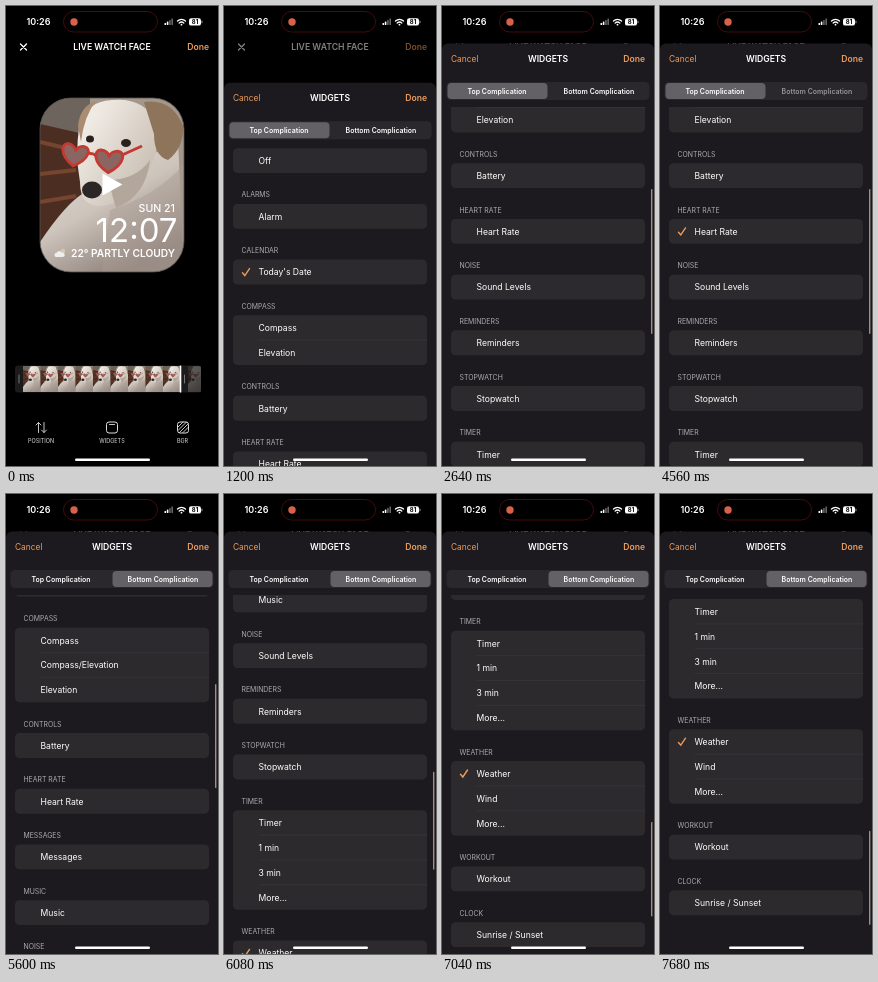
An HTML page for the animation above (8000 ms loop, 212x460 px).

```html
<!DOCTYPE html>
<html lang="en">
<meta charset="utf-8">
<title>Watch face widgets</title>
<style>
html, body { margin: 0; height: 100%; overflow: hidden; background: #000 }
svg { display: block }
#stage { width: 100vw; height: 100vh; font-family: Inter, Roboto, sans-serif }
</style>
<svg id="stage" viewBox="0 0 212 460">
  <defs>
    <clipPath id="list"><rect y="101" width="212" height="359"/></clipPath>
    <clipPath id="face"><rect x="34" y="92" width="144" height="174" rx="31"/></clipPath>
    <linearGradient id="fur" x2=".6" y2="1">
      <stop stop-color="#e6dfd8"/><stop offset=".55" stop-color="#cdc4bc"/><stop offset="1" stop-color="#8d8079"/>
    </linearGradient>
    <linearGradient id="head" x2="1" y2=".8">
      <stop offset=".2" stop-color="#efeae3"/><stop offset="1" stop-color="#c4b9ae"/>
    </linearGradient>
    <path id="heart" d="M0 12C-16 3-15-9-8-9-4-9-1-6 0-4 1-6 4-9 8-9 15-9 16 3 0 12Z" fill="#8a6663" stroke="#c23a31" stroke-width="2.8"/>
    <g id="photo">
      <path d="M34 92h144v174H34z" fill="#a3968b"/>
      <path d="M34 92h50v42H34z" fill="#6d645d"/>
      <path d="M34 118l44 10v90l-44 20z" fill="#4c2d22"/>
      <path d="M34 136l34 8M34 168l36-4M34 196l36-6" stroke="#75452f" stroke-width="4"/>
      <path d="M34 236Q58 200 76 188L172 134 178 266H34z" fill="url(#fur)"/>
      <path d="M104 204Q150 190 178 158V266H96z" fill="#a89c93" opacity=".45"/>
      <path d="M73 122Q79 95 106 94 138 91 150 116 156 148 138 170 122 197 94 200 74 200 74 176 69 150 73 122Z" fill="url(#head)"/>
      <path d="M138 96Q166 92 177 120 178 142 162 154 148 150 148 128Z" fill="#8f745c"/>
      <path d="M72 120Q74 100 90 95 78 110 75 136Z" fill="#a98c72"/>
      <path d="M102 174Q130 174 144 154 140 190 110 202Z" fill="#b3a79c"/>
      <ellipse cx="84" cy="133" rx="4" ry="3.500" fill="#2a211d"/>
      <ellipse cx="120" cy="137" rx="5" ry="4" fill="#2a211d"/>
      <ellipse cx="86" cy="184" rx="10" ry="8.500" fill="#2b2727"/>
      <path d="M114 150L136 140M79 148Q85 146 91 150" fill="none" stroke="#c23a31" stroke-width="3"/>
      <use href="#heart" transform="translate(69 148) rotate(10)"/>
      <use href="#heart" transform="translate(103 154) rotate(4) scale(1.05)"/>
    </g>
  </defs>
  <g id="home"></g>
  <rect id="dim" width="212" height="460"/>
  <g id="sheet"></g>
  <g id="status"></g>
</svg>
<script>
const $ = id => document.getElementById(id);
const ORANGE = '#eb9c5c', ROW = 24.85, GAP = 30.85;

// Text centred vertically on cy
const text = (x, cy, s, size, { fill = '#fff', anchor = 'start', weight = 400, more = '' } = {}) =>
  `<text x="${x}" y="${cy + size * .36}" font-size="${size}" fill="${fill}" text-anchor="${anchor}" font-weight="${weight}" ${more}>${s}</text>`;
const rect = (x, y, w, h, r, fill, more = '') =>
  `<rect x="${x}" y="${y}" width="${w}" height="${h}" rx="${r}" fill="${fill}" ${more}/>`;
const line = (d, stroke, width, more = '') =>
  `<path d="${d}" fill="none" stroke="${stroke}" stroke-width="${width}" stroke-linecap="round" ${more}/>`;
const mid = { anchor: 'middle' }, bold = { anchor: 'middle', weight: 600 };
const thumb = (x, w, o = 1) =>
  `<svg x="${x}" y="360" width="${w}" height="26" viewBox="34 92 122 174" preserveAspectRatio="xMidYMid slice" opacity="${o}"><use href="#photo"/></svg>`;

function drawHome() {
  let s = line('M14.5 38l6 6m0-6l-6 6', '#fff', 1.3) +
    text(106, 41.2, 'LIVE WATCH FACE', 8.7, bold) +
    text(203, 41.2, 'Done', 8.6, { fill: ORANGE, anchor: 'end', weight: 600 }) +
    '<g clip-path="url(#face)"><use href="#photo"/></g>' +
    rect(34, 92, 144, 174, 31, 'none', 'stroke="#55514e" stroke-width=".8"') +
    '<path d="M96.500 167.500v22l20-11z" fill="#fff"/>' +
    text(169, 202, 'SUN 21', 10.6, { anchor: 'end', weight: 500 }) +
    text(171.5, 224.5, '12:07', 33, { anchor: 'end', weight: 400 }) +
    text(169, 247, '22° PARTLY CLOUDY', 10.2, { anchor: 'end', weight: 600 }) +
    '<circle cx="57" cy="245" r="2.200" fill="#d8c8a8"/><path d="M50 251a2.200 2.200 0 0 1 .5-4.300 3 3 0 0 1 5.500 0 2.200 2.200 0 0 1 1 4.300z" fill="#eee"/>' +
    rect(9, 359.5, 186, 27, 3, '#1b1b1c');
  for (let i = 0; i < 9; i++) s += thumb(17 + i * 17.5, 17.5);
  s += thumb(182, 13, .3) + rect(173.7, 359.5, 1.6, 27, .5, '#fff') +
    line('M13 369v8M178.500 369v8', '#77777a', 1) +
    line('M32.500 426.500v-10l-2.500 2.500m2.500-2.500l2.500 2.500M38 416.500v10l-2.500-2.500m2.500 2.500l2.500-2.500', '#ddd', .9) +
    rect(100.5, 416, 11, 11, 2.5, 'none', 'stroke="#ddd"') +
    line('M103.500 418.500h5', '#ddd', .9) +
    rect(171.5, 416, 11, 11, 2.5, 'none', 'stroke="#ddd"') +
    line('M172 421l5-5M172 424.500l8.500-8.500M173.500 426.500l8.500-8.500M177 426.500l5-5', '#ddd', .9) +
    [[35, 'POSITION'], [106, 'WIDGETS'], [176.5, 'BGR']].map(([x, name]) =>
      text(x, 435.2, name, 5.5, { ...mid, fill: '#ddd' })).join('');
  $('home').innerHTML = s;
}

const start = [['', 'Off'], ['Alarms', 'Alarm'], ['Calendar', "Today's Date"]];
const topList = [...start, ['Compass', 'Compass', 'Elevation'], ['Controls', 'Battery'],
  ['Heart rate', 'Heart Rate'], ['Noise', 'Sound Levels'], ['Reminders', 'Reminders'],
  ['Stopwatch', 'Stopwatch'], ['Timer', 'Timer']];
const bottomList = [...start, ['Compass', 'Compass', 'Compass/Elevation', 'Elevation'], ['Controls', 'Battery'],
  ['Heart rate', 'Heart Rate'], ['Messages', 'Messages'], ['Music', 'Music'], ['Noise', 'Sound Levels'],
  ['Reminders', 'Reminders'], ['Stopwatch', 'Stopwatch'], ['Timer', 'Timer', '1 min', '3 min', 'More...'],
  ['Weather', 'Weather', 'Wind', 'More...'], ['Workout', 'Workout'], ['Clock', 'Sunrise / Sunset']];

function drawList(sections, id, ...checks) {
  let y = 103, s = '';
  for (const [head, ...rows] of sections) {
    s += text(17.5, y - 8.9, head.toUpperCase(), 6.9, { fill: '#adabb0' }) +
      rect(9, y, 194, rows.length * ROW, 4.5, '#2c2a2d');
    rows.forEach((name, i) => {
      const cy = y + ROW * (i + .5) + .3;
      if (i) s += line(`M35 ${y + ROW * i}H203`, '#3d3c40', .5);
      s += text(34.5, cy, name, 8.6);
      if (checks.includes(name))
        s += line(`M18.500 ${cy + .5}l2.300 2.700 4.700-7`, ORANGE, 1.4, `data-check="${name}"`);
    });
    y += rows.length * ROW + GAP;
  }
  return `<g id="${id}">${s}</g>`;
}

function drawSheet() {
  $('sheet').innerHTML = rect(0, 37.5, 212, 440, 6, '#1c1a1e') +
    text(9, 52.7, 'Cancel', 8.4, { fill: ORANGE }) +
    text(106, 52.7, 'WIDGETS', 8.6, bold) +
    text(203, 52.7, 'Done', 8.6, { fill: ORANGE, anchor: 'end', weight: 600 }) +
    rect(4.5, 76, 203, 18, 4.5, '#2a282c') +
    rect(5.5, 77, 100, 16, 4, '#636166', 'id="pill"') +
    text(55, 85.2, 'Top Complication', 7, bold) +
    text(157, 85.2, 'Bottom Complication', 7, { ...bold, more: 'id="tab2"' }) +
    `<g clip-path="url(#list)">${drawList(topList, 'listA', "Today's Date", 'Heart Rate')}${drawList(bottomList, 'listB', 'Weather')}</g>` +
    rect(209, 0, 1.4, 145, .7, '#a58c85', 'id="bar"');
}

function drawStatus() {
  $('status').innerHTML = text(20.5, 16.2, '10:26', 9, { weight: 600 }) +
    rect(57.5, 5.5, 94, 20.5, 10.25, '#000', 'stroke="#400e0b" stroke-width="1"') +
    '<circle cx="68" cy="16" r="3.700" fill="#d8614a"/>' +
    [2, 3.5, 5, 6.5].map((h, i) => rect(158.5 + i * 2.3, 19 - h, 1.6, h, .5, i < 2 ? '#fff' : '#666')).join('') +
    line('M171.500 15a6 6 0 0 1 8 0M173.200 17a3.600 3.600 0 0 1 4.600 0', '#fff', 1.3) +
    '<circle cx="175.500" cy="18.700" r=".9" fill="#fff"/>' +
    rect(183, 12.2, 12, 7.4, 2.2, '#fff') + rect(195.5, 14.5, .9, 2.8, .4, '#aaa') +
    text(189, 15.9, '81', 6, { ...mid, fill: '#000', weight: 700 }) +
    rect(69, 452.5, 75, 2.5, 1.25, '#fff');
}

const clamp = v => Math.min(1, Math.max(0, v));
const easeOut = (p, n) => 1 - (1 - p) ** n;

// Flicks: [first time, last time, from, to, ease power]
const flicksA = [[2160, 2640, 0, 193.4, 1.48]];
const flicksB = [[5520, 5600, 66, 136.4, 1], [5600, 6560, 136.4, 553.4, 2], [6640, 7520, 553.4, 660.4, 2]];
const scrollAt = (flicks, t) => flicks.reduce((y, [a, b, from, to, n]) =>
  t > a ? from + (to - from) * easeOut(clamp((t - a) / (b - a)), n) : y, flicks[0][2]);

const show = (el, on) => el.style.display = on ? '' : 'none';

function render(t) {
  // Critically damped rise of the sheet
  const x = Math.max(0, t - 800) / 100;
  const away = t >= 1520 ? 0 : (1 + x) * Math.exp(-x);
  $('sheet').setAttribute('transform', `translate(0 ${away * 428})`);
  $('dim').setAttribute('opacity', .55 * (1 - away));

  const second = t >= 4640;
  const a = scrollAt(flicksA, t), b = scrollAt(flicksB, t);
  show($('listA'), !second);
  show($('listB'), second);
  $('listA').setAttribute('transform', `translate(0 ${-a})`);
  $('listB').setAttribute('transform', `translate(0 ${-b})`);
  for (const mark of $('listA').querySelectorAll('[data-check]'))
    show(mark, (mark.dataset.check === 'Heart Rate') === t >= 3120);

  const p = clamp((t - 4560) / 320);
  $('pill').setAttribute('x', 5.5 + 101 * p * p * (3 - 2 * p));
  $('tab2').setAttribute('opacity', t >= 4560 && t < 4720 ? .5 : 1);

  show($('bar'), t >= 2240 && t < 3440 || t >= 4560 && t < 4880 || t >= 5600);
  $('bar').setAttribute('y', second ? 190 + .28 * (b - 136) : 120 + .326 * a);
  $('bar').setAttribute('height', second ? 104 - .019 * (b - 136) : 145);
}

function tick(now) {
  render(Math.floor(now % 8000 / 80) * 80); // 12.5 steps a second
  requestAnimationFrame(tick);
}

drawHome();
drawSheet();
drawStatus();
tick(0);
</script>
</html>
```
